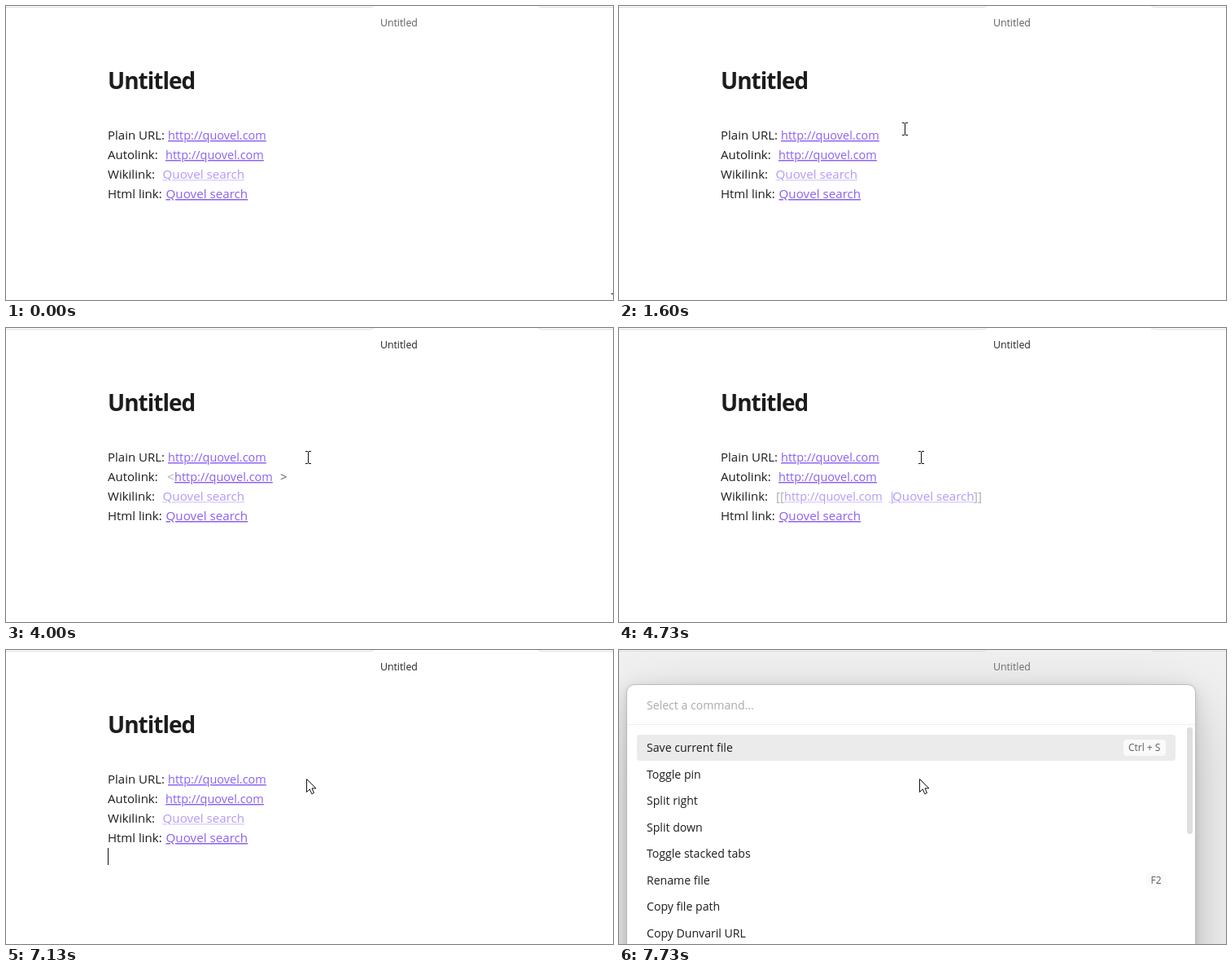
An HTML page for the animation above (8000 ms loop, 746 px wide and 361 px high).

```html
<!DOCTYPE html>
<html lang="en">
<head>
<meta charset="utf-8">
<title>Link styles</title>
<style>
html, body { margin: 0; width: 100%; height: 100%; overflow: hidden; background: #fff; }
svg, #veil { position: absolute; left: 0; top: 0; width: 746px; height: 361px; overflow: hidden; }
text { font: 15px "Open Sans", "Noto Sans", sans-serif; fill: #1c1c1c; white-space: pre; }
.head { font-size: 28px; font-weight: 700; letter-spacing: -1px; }
.tab { font-size: 12.3px; fill: #5c5c5c; }
.focus { fill: #222; }
.link, .soft { font-size: 15.2px; text-decoration: underline 1px; }
.link { fill: #8a60f2; }
.hover { fill: #a68af9; }
.soft { fill: #ddd2fb; }
.soft tspan { fill: #b29bf7; }
.url { font-size: 14.5px; }
.dim { fill: #ababab; }
.mark { fill: #5c5c5c; }
.tag { fill: #d0403f; }
.attr { fill: #e0ac00; }
.str { fill: #08b05a; font-size: 14.6px; }
.item { font-size: 14.1px; }
.key { font-size: 12px; fill: #5c5c5c; }
.crisp { shape-rendering: crispEdges; }
#veil { background: rgba(220, 220, 220, .4); }
#box {
  position: absolute; left: 9px; top: 42px; width: 698px; height: 500px;
  background: #fff; border: 1px solid #bdbdbd; border-radius: 10px;
  box-shadow: 0 1.8px 7.3px rgba(0,0,0,.071), 0 6.3px 24.7px rgba(0,0,0,.112), 0 30px 90px rgba(0,0,0,.2);
}
</style>
</head>
<body>
<svg id="page" viewBox="0 0 746 361"></svg>
<div id="veil"><div id="box"></div></div>
<svg id="over" viewBox="0 0 746 361"></svg>
<script>
const LOOP = 8000, OPEN = 7200;
const SITE = 'http://quovel.com', NAME = 'Quovel search';
const $ = id => document.getElementById(id);
const esc = s => s.replace(/</g, '&lt;');
// The inner tspan lets an underline keep a colour of its own
const text = (x, y, s, cls = '', id = '') =>
  `<text x="${x}" y="${y}" class="${cls}" id="${id}"><tspan>${esc(s)}</tspan></text>`;
const rect = (x, y, w, h, fill, r = 0) =>
  `<rect x="${x}" y="${y}" width="${w}" height="${h}" rx="${r}" fill="${fill}"/>`;
const group = (id, s) => `<g id="${id}">${s}</g>`;
const row = n => 164 + 24 * n;

$('page').innerHTML =
  '<path d="M0 1.5H446Q451 1.5 452 0M654 0Q655 1.5 660 1.5H746" fill="none" stroke="#dedede"/>' +
  text(460, 25, 'Untitled', 'tab', 'tab') +
  text(125, 102, 'Untitled', 'head') +
  ['Plain URL:', 'Autolink:', 'Wikilink:', 'Html link:'].map((s, i) => text(125, row(i), s)).join('') +
  text(199, row(0), SITE, 'link url', 'plain') +
  group('auto', text(196, row(1), SITE, 'link url')) +
  group('autoRaw', text(198, row(1), '<', 'dim') + text(207, row(1), SITE, 'link url') +
    text(337, row(1), '>', 'mark')) +
  group('wiki', text(192.5, row(2), NAME, 'soft')) +
  group('wikiRaw', text(193, row(2), '[[', 'dim') + text(203, row(2), SITE, 'soft url') +
    text(331.5, row(2), '|', 'soft') + text(336, row(2), NAME, 'soft') + text(436, row(2), ']]', 'dim')) +
  group('html', text(196.5, row(3), NAME, 'link')) +
  group('htmlRaw', text(197, row(3), '<', 'mark') + text(206.5, row(3), 'a', 'tag') +
    text(220, row(3), 'href', 'attr') + text(249.5, row(3), '=') +
    text(259, row(3), "'https://quovel.com'", 'str') + text(403.5, row(3), '>', 'mark') +
    text(413, row(3), NAME) + text(515, row(3), '</', 'mark') +
    text(531, row(3), 'a', 'tag') + text(540.5, row(3), '>', 'mark')) +
  '<rect id="caret" class="crisp" width="1" height="21" fill="#111"/>';

const items = ['Save current file', 'Toggle pin', 'Split right', 'Split down',
  'Toggle stacked tabs', 'Rename file', 'Copy file path', 'Copy Dunvaril URL'];

$('over').innerHTML =
  group('palette',
    text(34, 73, 'Select a command...', 'item dim') +
    rect(10, 91, 698, 1, '#efefef') +
    rect(22, 104, 662, 32, '#ebebeb', 4) +
    rect(698, 95, 7, 131, '#dedede', 3.5) +
    items.map((s, i) => text(34, Math.round(125 + 32.5 * i), s, 'item')).join('') +
    rect(620, 110, 52, 20, '#fafafa', 4) + text(626, 124, 'Ctrl + S', 'key') +
    rect(648, 273, 24, 20, '#fafafa', 4) + text(653.5, 287, 'F2', 'key') +
    group('inputCaret', rect(34, 57, 1, 20, '#111'))) +
  group('beam', '<path class="crisp" d="M-3 -8h3v1h1v-1h3v1h-3v14h3v1h-3v-1h-1v1h-3v-1h3v-14h-3z" fill="#111"/>') +
  '<path id="arrow" transform="translate(369.5 158.5)" d="M0 0V16L3.8 12.4 6.3 18.2 9 17 6.5 11.4H11.5Z" fill="#fff" stroke="#111"/>';

// Text caret: [on, off, x, row]
const carets = [[2330, 2800, 328, 0], [3330, 3400, 328, 0], [3470, 4000, 347, 1], [4200, 4730, 445, 2],
  [4870, 5470, 550, 3], [5730, 6270, 125, 4], [6800, OPEN, 125, 4]];

const show = (id, on) => { $(id).style.display = on ? '' : 'none'; };
const mix = (a, b, p) => a + (b - a) * p;

function pointer(t) {
  const step = Math.floor((t + 3) * 15 / 1000);
  if (t < 1070) return [747, 361];
  if (t < 1670) {
    const p = Math.min(1, (step - 15) / 9), e = 1 - (1 - p) ** 2;
    return [mix(747, 351, e), mix(361, 151, e)];
  }
  if (t < 1870) {
    const p = (step - 24) / 4;
    return [mix(351, 349, p) - 26 * Math.sin(Math.PI * p), mix(151, 157, p)];
  }
  if (t < 2470) return [349, 157];
  return t < 2530 ? [362, 158] : [371, 159];
}

function swap(id, t, from, to) {
  const raw = t >= from && t < to;
  show(id, !raw);
  show(id + 'Raw', raw);
}

function draw(t) {
  $('tab').setAttribute('class', t >= 2200 ? 'tab focus' : 'tab');
  $('plain').setAttribute('class', t >= 1670 && t < 1800 ? 'link url hover' : 'link url');
  swap('auto', t, 3400, 4200);
  swap('wiki', t, 4200, 4870);
  swap('html', t, 4870, 5730);

  const c = carets.find(([on, off]) => t >= on && t < off);
  show('caret', c);
  if (c) {
    $('caret').setAttribute('x', c[2]);
    $('caret').setAttribute('y', 147 + 24 * c[3]);
  }

  const [x, y] = pointer(t);
  $('beam').setAttribute('transform', `translate(${Math.round(x)} ${Math.round(y)})`);
  show('beam', t < 7130);
  show('arrow', t >= 7130);
  show('veil', t >= OPEN);
  show('palette', t >= OPEN);
  show('inputCaret', t < 7730);
}

const start = performance.now();
function tick() {
  draw((performance.now() - start) % LOOP);
  requestAnimationFrame(tick);
}
tick();
</script>
</body>
</html>
```
